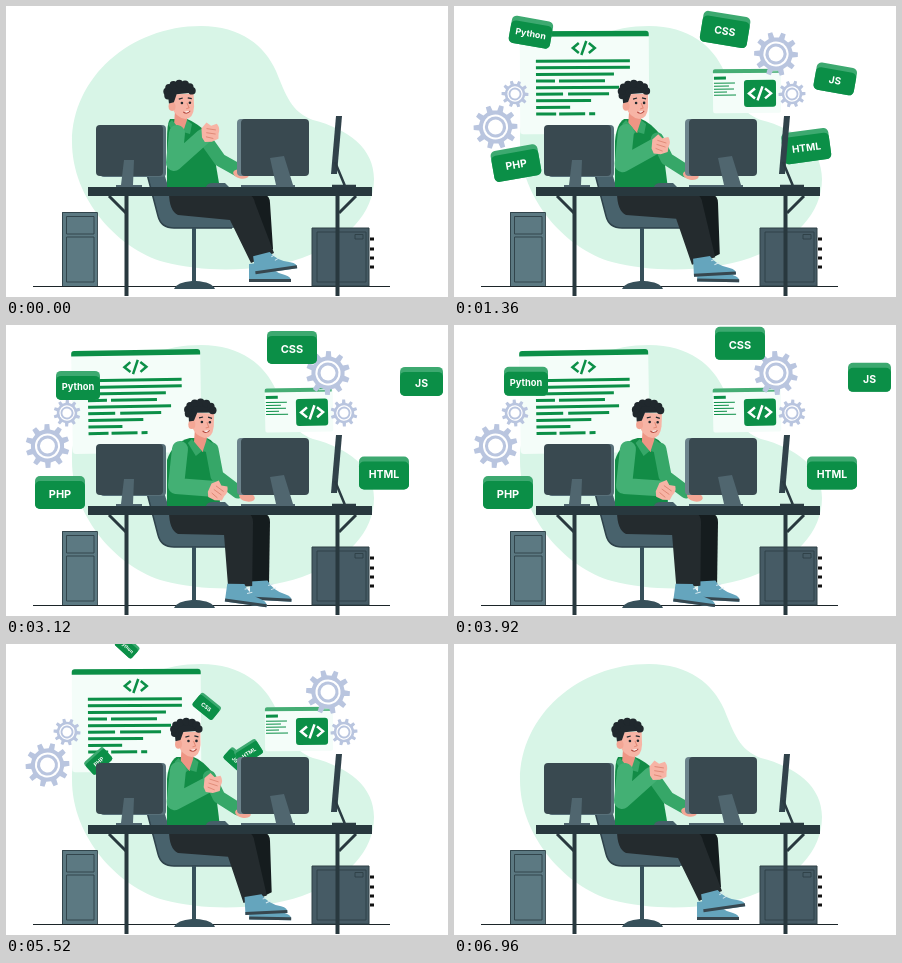
These frames come from a looping animation (442 px wide and 291 px high, 7 s). An HTML page:

```html
<!DOCTYPE html>
<html lang="en">
<head>
<meta charset="utf-8">
<title>Developer at work</title>
<style>
  html, body { margin: 0; width: 100%; height: 100%; overflow: hidden; background: #fff; }
  svg { display: block; width: 100%; height: 100%; }
  text { font-family: Inter, "Open Sans", sans-serif; font-weight: 700; fill: #fff; text-anchor: middle; }
  .limb { fill: none; stroke-linecap: round; stroke-linejoin: round; }
</style>
</head>
<body>
<svg viewBox="0 0 442 291">
  <defs>
    <g id="code" fill="none" stroke-width="2.5">
      <path d="M-5-5L-11 0L-5 5M5-5L11 0L5 5M2.5-7L-2.5 7"/>
    </g>
    <g id="shoe">
      <path d="M-9-7L8-9Q14 1 27 4Q34 6 33 11H-9Z" fill="#65a5bd"/>
      <path d="M-9 8H33V11H-9Z" fill="#37474f"/>
      <path d="M9-4L14-6M12 0L17-2" stroke="#d5e8ee"/>
    </g>
  </defs>

  <path fill="#d8f5e7" d="M195 20C235 20 259 40 270 65C280 89 285 106 307 114C342 123 368 142 368 173C368 207 341 236 296 252C255 266 200 267 158 256C112 243 66 193 66 136C66 72 124 20 195 20Z"/>

  <g id="windows"></g>
  <g id="gears"></g>
  <g id="tags"></g>

  <path d="M27 280.5H384" stroke="#1c2529"/>
  <g stroke="#2e4047">
    <path d="M56 206H91V280H56Z" fill="#5c7982" stroke="none"/>
    <path d="M56.500 280V206.500H91.500V280M60.500 210.500H88V228H60.500ZM60.500 231H88V276H60.500Z" fill="none" stroke-width=".9"/>
    <path d="M306 222H363V280H306Z" fill="#465b65"/>
    <path d="M311 226H360V276H311ZM349 228.500H357V233H349Z" fill="none" stroke-width=".9"/>
    <path d="M364 233H368M364 243H368M364 252H368M364 261H368" stroke="#111" stroke-width="3"/>
  </g>

  <!-- chair -->
  <path d="M141 168Q148 162 158 167L168 200H232Q240 211 234 219Q232 222 226 222H168Q155 222 152 210Z" fill="#48626c"/>
  <path d="M141 168L152 210Q155 222 168 222H226" fill="none" stroke="#2e424b" stroke-width="1.500"/>
  <path d="M186 222H190V275Q206 276 209 283H168Q171 276 186 275Z" fill="#37505a"/>

  <!-- man -->
  <path id="backLeg" fill="#151c1e"/>
  <use id="backShoe" href="#shoe"/>
  <path id="frontLeg" fill="#242b2e"/>
  <use id="frontShoe" href="#shoe"/>
  <path id="torso" fill="#128c46"/>
  <path id="rightArm" class="limb" stroke="#36a768" stroke-width="13"/>
  <ellipse id="rightHand" rx="8" ry="4.500" fill="#f3a695"/>
  <g id="neck">
    <path d="M-5-9H7V6L3 13L-6 5Z" fill="#ee9584"/>
    <path d="M-8 0L2 12L-4 17L-12 4ZM7 0L3 12L10 14L12 4Z" fill="#36a768"/>
  </g>
  <g id="head">
    <path d="M-11-11H11V2Q10 14 2 14Q-8 12-11 2Z" fill="#f7b4a5"/>
    <ellipse cx="-11" cy="1" rx="3.500" ry="4.500" fill="#f3a695"/>
    <g id="hair" fill="#20282d"></g>
    <path d="M-4-6L0-7M5-7L9-6" stroke="#20282d" stroke-width="1.200"/>
    <g fill="#20282d"><circle cx="-1" cy="-2" r="1.300"/><circle cx="7" cy="-2" r="1.300"/></g>
    <path d="M4-2L6 3L3 4" fill="none" stroke="#e28976"/>
    <path d="M0 7Q4 10 7 6" fill="#fff" stroke="#b5493f"/>
  </g>
  <path id="leftArm" class="limb" stroke="#43b074" stroke-width="16"/>
  <g id="leftHand">
    <path d="M-9 5L-8-4L-2-9L2-5L8-6Q11-1 8 4L7 9L0 11L-7 10Z" fill="#f7b4a5"/>
    <path d="M-3-3L6 0M-4 1L5 4M-5 5L2 8" stroke="#de8875" stroke-width=".9"/>
  </g>

  <!-- desk and screens -->
  <path d="M200 181Q201 177 207 177H219L223 181Z" fill="#466069"/>
  <path d="M330 110H336L331 168H325Z" fill="#30424a"/>
  <path d="M329 156L339 180M326 180H350" stroke="#2b3b42" stroke-width="2.500"/>
  <rect x="94" y="119" width="66" height="52" rx="4" fill="#587079"/>
  <rect x="90" y="119" width="67" height="51" rx="4" fill="#394950"/>
  <path d="M118 154H128L127 179H136V182H110V179H115Z" fill="#50666f"/>
  <rect x="231" y="113" width="67" height="57" rx="4" fill="#6c838c"/>
  <rect x="235" y="113" width="68" height="57" rx="4" fill="#394950"/>
  <path d="M264 152L278 150L287 179H289V182H235V179H270Z" fill="#50666f"/>
  <g fill="none" stroke="#28383e">
    <path d="M82 185.500H366" stroke-width="9"/>
    <path d="M120.500 190V290M331.500 190V290" stroke-width="4"/>
    <path d="M103 190L120 207M350 190L333 207" stroke-width="3"/>
  </g>
</svg>

<script>
const LOOP = 7000, GREEN = '#0b8f47';
const $ = id => document.getElementById(id);
const clamp = x => Math.max(0, Math.min(1, x));
const mix = (a, b, k) => a + (b - a) * k;
const ramp = (t, from, to) => clamp((t - from) / (to - from));
const ease = x => x * x * (3 - 2 * x);
const smoother = x => x * x * x * (10 - 15 * x + 6 * x * x);

function add(parent, markup) {
  const g = document.createElementNS('http://www.w3.org/2000/svg', 'g');
  g.innerHTML = markup;
  return parent.appendChild(g);
}
const place = (el, x, y, angle = 0, scale = 1) =>
  el.setAttribute('transform', `translate(${x} ${y}) rotate(${angle}) scale(${scale})`);

// Windows, drawn around their centres
const codeRows = ['82-176', '82-176', '82-160', '82-101 105-151', '82-165',
  '82-109 114-155', '82-137', '82-116', '82-102 105-131 135-141'];
const codeLines = codeRows.map((row, i) => row.split(' ').map(part => {
  const [a, b] = part.split('-');
  return `M${a - 130} ${-21.5 + i * 6.6}H${b - 130}`;
}).join('')).join('');

const windows = [
  { x: 130, y: 76.5, el: add($('windows'), `
    <rect x="-64" y="-51.500" width="129" height="103" rx="3" fill="#f4fdf9"/>
    <path d="M-64-46V-48.500Q-64-51.500-61-51.500H62Q65-51.500 65-48.500V-46Z" fill="${GREEN}"/>
    <use href="#code" y="-34.500" stroke="${GREEN}"/>
    <path d="${codeLines}" stroke="${GREEN}" stroke-width="3"/>`) },
  { x: 293, y: 85, el: add($('windows'), `
    <rect x="-34" y="-22" width="68" height="44" rx="2" fill="#f4fdf9"/>
    <path d="M-34-18V-20Q-34-22-32-22H33V-18Z" fill="#45ad74"/>
    <path d="M20-20H31" stroke="#d9f5e7"/>
    <path d="M-33-13H-21" stroke="${GREEN}" stroke-width="3"/>
    <path d="M-33-8H-12M-33-5H-18M-33-2H-13M-33 1H-20M-33 4H-11" stroke="${GREEN}"/>
    <rect x="-3" y="-11" width="32" height="27" rx="3" fill="${GREEN}"/>
    <use href="#code" x="13" y="2.500" stroke="#fff"/>`) }
];

function gearPath(r, teeth) {
  let d = '';
  for (let i = 0; i < teeth; i++) {
    [[-.27, .76], [-.17, 1], [.17, 1], [.27, .76]].forEach(([off, k]) => {
      const a = (i + off) / teeth * Math.PI * 2;
      d += `${d ? 'L' : 'M'}${(Math.cos(a) * r * k).toFixed(2)} ${(Math.sin(a) * r * k).toFixed(2)}`;
    });
  }
  return d + 'Z';
}
const gears = [[41.5, 121, 22, 1], [61, 88, 13.5, -1], [322, 48, 22, -1], [338, 88, 13.5, 1]]
  .map(([x, y, r, spin]) => ({ x, y, spin, el: add($('gears'), `
    <path d="${gearPath(r, 10)}" fill="#b9c5df"/>
    <circle r="${r * .57}" fill="#fff"/>
    <circle r="${r * .41}" fill="none" stroke="#b9c5df" stroke-width="${r * .14}"/>`) }));

// Each tag flies through four points, reached at the times in KNOTS
const KNOTS = [0, .28, .78, 1];
const tags = [
  { label: 'JS', w: 43, h: 29, size: 10.5, turn: 62, bob: 1, path: [[192, 150], [230, 115], [381, 73], [415.5, 56]] },
  { label: 'HTML', w: 50, h: 33, size: 10.5, turn: -48, bob: 0, path: [[192, 150], [243, 108], [352, 140], [378, 148]] },
  { label: 'CSS', w: 50, h: 33, size: 11, turn: 58, bob: 1, path: [[185, 140], [201, 62], [271, 23.5], [286, 22]] },
  { label: 'Python', w: 44, h: 29, size: 9.3, turn: 62, bob: 1, path: [[150, 110], [121, 2], [77, 26], [72, 60]] },
  { label: 'PHP', w: 50, h: 33, size: 11, turn: -62, bob: 0, path: [[130, 140], [92, 117], [62, 157], [54, 167.5]] }
];
for (const tag of tags) {
  const { w, h, size, label } = tag;
  tag.el = add($('tags'), `
    <rect x="${-w / 2}" y="${-h / 2}" width="${w}" height="${h}" rx="5" fill="#3da970"/>
    <rect x="${-w / 2}" y="${-h / 2 + 5}" width="${w}" height="${h - 5}" rx="5" fill="${GREEN}"/>
    <text y="${size * .36 + 1.5}" font-size="${size}">${label}</text>`);
}
const flight = (points, u, axis) => points.reduce((sum, point, i) =>
  sum + point[axis] * KNOTS.reduce((k, knot, j) =>
    j === i ? k : k * (u - knot) / (KNOTS[i] - knot), 1), 0);

// Curly hair
let curls = '<path d="M-15-15Q-8-23 4-21Q12-17 11-12L-6-11L-9-3L-14-2Z"/>';
for (let i = 0; i < 8; i++) {
  const a = Math.PI * (.88 + i * .155);
  curls += `<circle cx="${-3 + 12.5 * Math.cos(a)}" cy="${-13 + 8.5 * Math.sin(a)}" r="3.8"/>`;
}
$('hair').innerHTML = curls;

function drawMan(p) {
  const m = (a, b) => mix(a, b, p).toFixed(2);
  const line = (id, d) => $(id).setAttribute('d', d);
  const n = mix(173, 193, p);
  line('torso', `M${n - 9} 113Q${m(161, 167)} 117 161 135V183H214L${m(205, 213)} 130Q${n + 17} 116 ${n + 8} 113Z`);
  line('leftArm', `M${m(171, 174)} ${m(127, 124)}L${m(168, 170)} ${m(157, 161)}L${m(197, 206)} ${m(131, 164)}`);
  line('rightArm', `M${m(202, 206)} ${m(137, 124)}L${m(214, 211)} ${m(154, 151)}L${m(232, 232)} ${m(164, 167)}`);
  line('frontLeg', `M163 186H240Q${m(248, 247)} 190 ${m(249, 247)} 197L${m(268, 246)} ${m(247, 261)}` +
    `L${m(245, 222)} ${m(257, 263)}L${m(224, 218)} ${m(214, 210)}L172 209Q163 205 163 186Z`);
  line('backLeg', `M225 188H258Q264 190 264 197L${m(267, 263)} ${m(243, 259)}L${m(252, 246)} ${m(254, 260)}Z`);
  place($('head'), mix(177, 197, p), 99, mix(-2, 2, p));
  place($('neck'), n + 1, 114);
  place($('leftHand'), mix(204, 212, p), mix(125, 165, p), mix(-10, 18, p));
  place($('rightHand'), mix(235, 241, p), mix(168, 172, p), 12);
  place($('frontShoe'), mix(257, 229, p), mix(256, 267, p), mix(-8, 8, p));
  place($('backShoe'), mix(252, 253, p), mix(265, 264, p), mix(0, 3, p));
}

function draw(t) {
  const lean = smoother(clamp(1 - Math.abs(t - 3460) / 3460));
  drawMan(lean);

  const pop = ease(ramp(t, 120, 680)) * (1 - ease(ramp(t, 5900, 6500)));
  for (const w of windows) place(w.el, w.x, w.y, -lean, pop);
  for (const g of gears) place(g.el, g.x, g.y, g.spin * t * 360 / LOOP, pop);

  const u = Math.min(ramp(t, 740, 1535), 1 - ramp(t, 5030, 5710));
  const hold = ease(ramp(t, 1535, 2100)) * (1 - ease(ramp(t, 5030, 5480)));
  const bob = hold * (-2.5 + 3.5 * Math.cos((t - 2750) / 3860 * Math.PI * 2));
  const scale = .15 + .85 * Math.sin(u * Math.PI / 2);
  for (const tag of tags) {
    tag.el.style.display = u > 0 ? '' : 'none';
    place(tag.el, flight(tag.path, u, 0), flight(tag.path, u, 1) + bob * tag.bob,
      tag.turn * Math.pow(1 - u, 1.2), scale);
  }
}

const start = performance.now();
function tick() {
  draw((performance.now() - start) % LOOP);
  requestAnimationFrame(tick);
}
tick();
</script>
</body>
</html>
```
